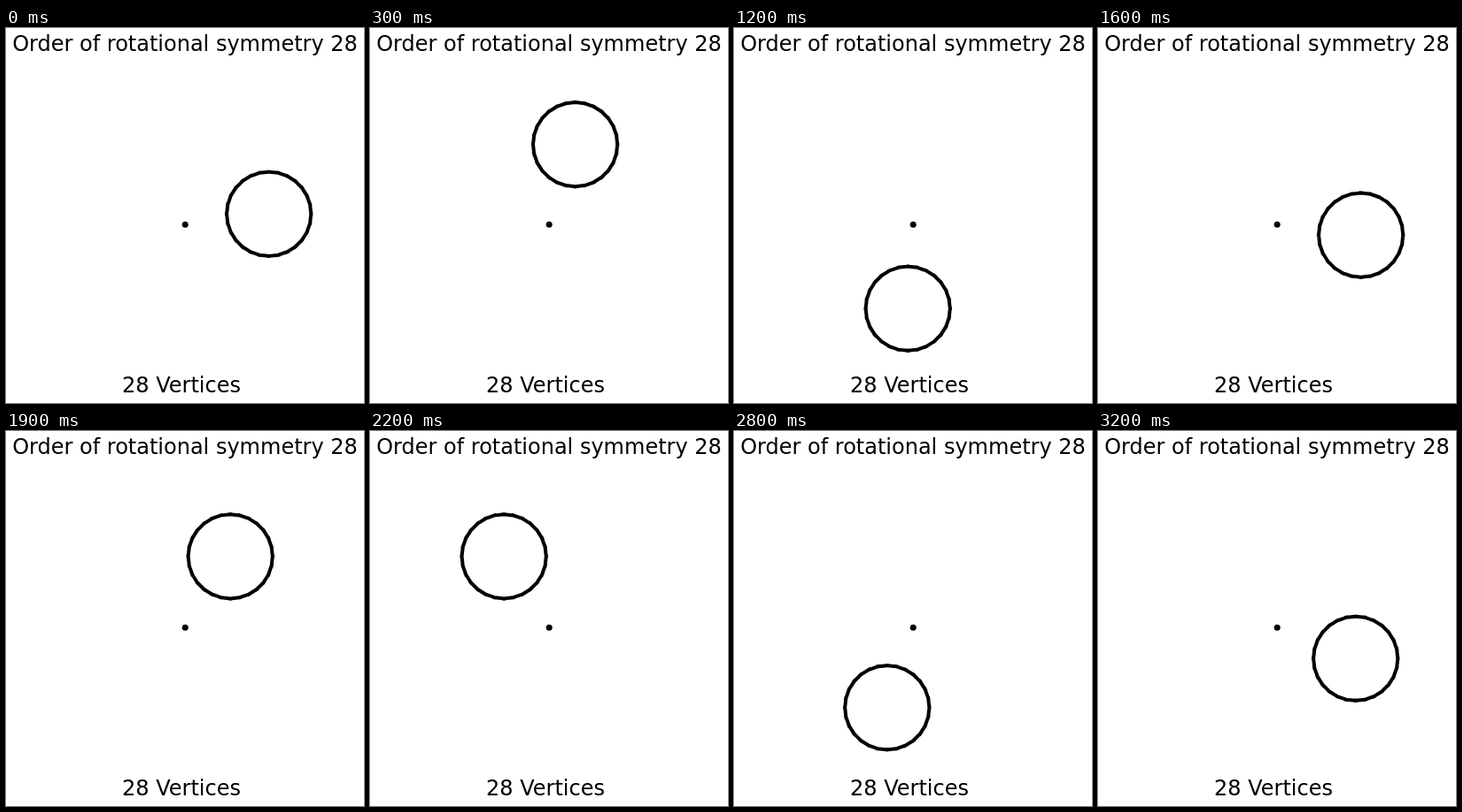
Write an HTML page with a canvas that moves like this. It is 404 by 424 pixels and loops after 3.3 s.

```html
<!DOCTYPE html>
<html lang="en">
<head>
<meta charset="utf-8">
<title>Order of rotational symmetry</title>
<style>
html, body { margin: 0; width: 100%; height: 100%; overflow: hidden; background: #fff; }
canvas { display: block; }
</style>
</head>
<body>
<canvas id="stage" width="404" height="424"></canvas>
<script>
const ctx = document.getElementById('stage').getContext('2d');
const SIDES = 28, STEP_MS = 100, STEPS = 33;
const CX = 202.2, CY = 222.2, ORBIT = 95.2, RADIUS = 47.6;
const TAU = Math.PI * 2;

function label(text, x, y) {
  ctx.fillText(text, x, y);
}

// Each side is its own stroke, so the square caps overlap at the corners.
function polygon(x, y) {
  ctx.beginPath();
  for (let i = 0; i < SIDES; i++) {
    const a = TAU * i / SIDES, b = TAU * (i + 1) / SIDES;
    ctx.moveTo(x + RADIUS * Math.cos(a), y + RADIUS * Math.sin(a));
    ctx.lineTo(x + RADIUS * Math.cos(b), y + RADIUS * Math.sin(b));
  }
  ctx.stroke();
}

function draw(now) {
  const step = Math.floor(now / STEP_MS) % STEPS;
  const angle = TAU * (1 + 3 * step) / 50;

  ctx.fillStyle = '#fff';
  ctx.fillRect(0, 0, 404, 424);
  ctx.fillStyle = ctx.strokeStyle = '#000';
  ctx.lineWidth = 4;
  ctx.lineCap = 'square';
  ctx.font = '24px "DejaVu Sans", sans-serif';
  ctx.textAlign = 'center';

  label('Order of rotational symmetry ' + SIDES, 202, 26);
  label(SIDES + ' Vertices', 198, 412);

  ctx.beginPath();
  ctx.arc(CX, CY, 3.5, 0, TAU);
  ctx.fill();

  polygon(CX + ORBIT * Math.cos(angle), CY - ORBIT * Math.sin(angle));
}

function tick() {
  draw(performance.now());
  requestAnimationFrame(tick);
}
tick();
</script>
</body>
</html>
```
